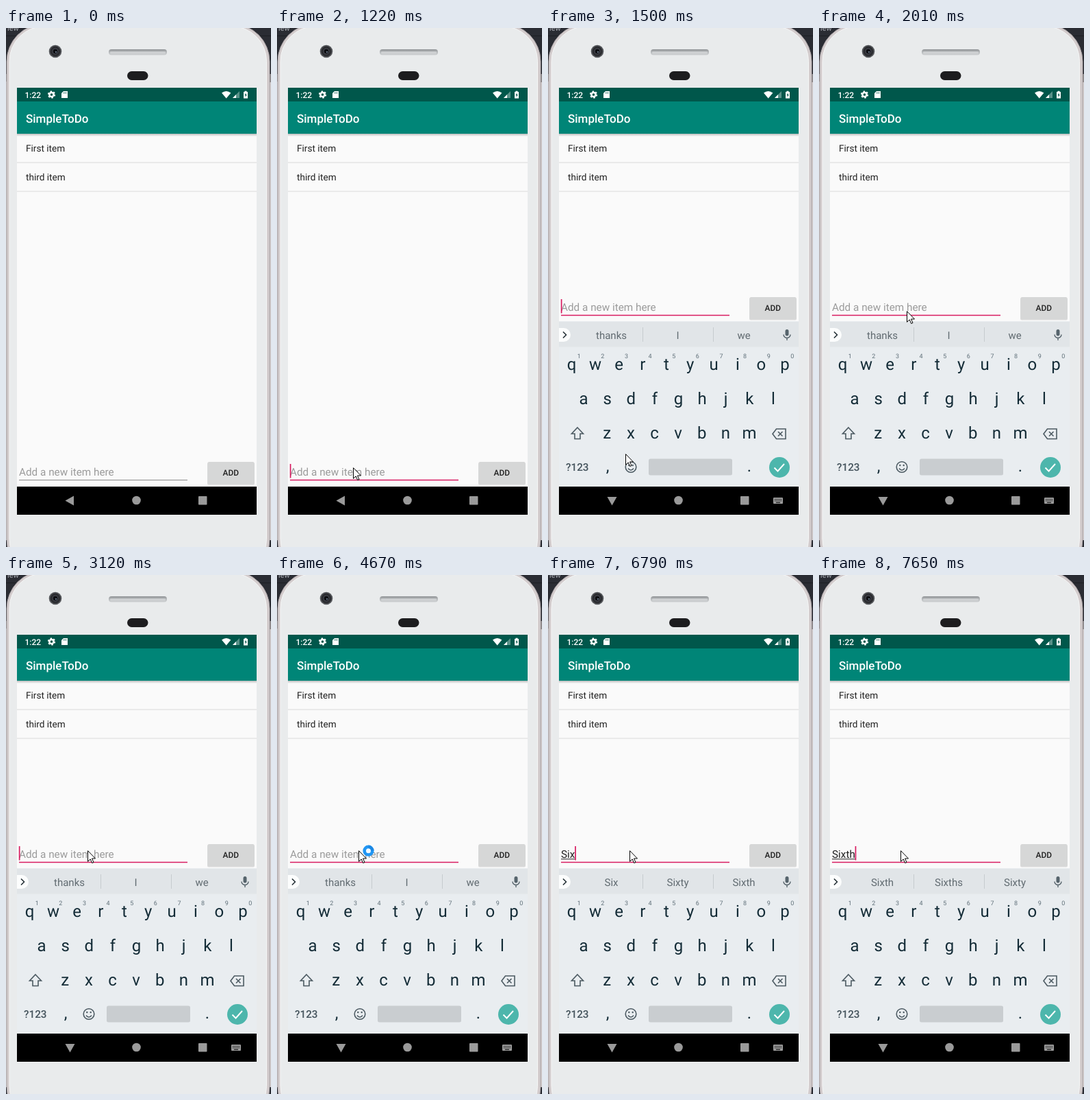
Recreate the animation shown at these times as an HTML page. Size 387 by 756 pixels, loop 8000 ms.

```html
<!DOCTYPE html>
<html lang="en">
<head>
<meta charset="utf-8">
<title>To-do list</title>
<style>
  html, body { margin: 0; width: 100%; height: 100%; overflow: hidden; background: #2a2c33; }
  svg { display: block; font-family: Roboto, sans-serif; text-rendering: geometricPrecision; }
  .mid { text-anchor: middle; }
  .key { font-size: 24px; fill: #142c37; }
  .num { font-size: 9px; fill: #607079; }
  .tip { font-size: 15px; fill: #616b71; }
  .field { font-size: 15.3px; }
  .item { font-size: 13.6px; fill: #212121; }
  .bold { font-weight: 500; }
  .icon { fill: none; stroke: #4c5a62; stroke-width: 1.6; }
</style>
</head>
<body>
<svg width="387" height="756" viewBox="0 0 387 756">
  <defs>
    <linearGradient id="fade" x2="0" y2="1">
      <stop stop-color="#000" stop-opacity=".25"/><stop offset="1" stop-color="#000" stop-opacity="0"/>
    </linearGradient>
    <linearGradient id="slot" x2="0" y2="1">
      <stop stop-color="#8f9295"/><stop offset=".5" stop-color="#b9bcbe"/><stop offset="1" stop-color="#cfd1d3"/>
    </linearGradient>
  </defs>

  <!-- Desktop and phone body -->
  <path d="M0 11.5H387" stroke="#1d1f24"/>
  <text x="-5" y="4" font-size="11" fill="#a9adb3">View</text>
  <path d="M272 0h9" stroke="#a9adb3"/>
  <path d="M0 68h3v688H0zM384 68h3v688h-3z" fill="#d2cccd"/>
  <path d="M0 67h2v11H0zM384 67h3v12h-3z" fill="#8b8688"/>
  <path d="M0 746h3v10H0zM384 746h3v10h-3z" fill="#2a2c33"/>
  <rect x="1" y="-6" width="384" height="806" rx="55" fill="#d3cccd" stroke="#a8a1a4"/>
  <rect x="5" y="-2.500" width="375.500" height="798" rx="51" fill="#e9ebec" stroke="#f6f6f6"/>
  <circle cx="72" cy="34" r="9.300" fill="#55575b"/>
  <circle cx="72" cy="34" r="7.500" fill="#2b2c30"/>
  <circle cx="72" cy="34" r="4" fill="#0c0d11" stroke="#4a4c55"/>
  <circle cx="73" cy="35" r="1.300" fill="#5b6877"/>
  <rect x="150" y="31" width="85" height="8.500" rx="4" fill="url(#slot)"/>
  <rect x="152" y="34.500" width="81" height="3" rx="1.500" fill="#d0d2d4"/>
  <rect x="177" y="63" width="30.500" height="13" rx="6.500" fill="#1d1d1f"/>

  <!-- Screen -->
  <rect x="16" y="87" width="350" height="622" fill="#fafafa"/>
  <rect x="16" y="154" width="350" height="4" fill="url(#fade)"/>
  <rect x="16" y="87" width="350" height="20" fill="#00574b"/>
  <rect x="16" y="107" width="350" height="47" fill="#008577"/>
  <g fill="#fff">
    <text class="bold" x="27.500" y="101.500" font-size="12">1:22</text>
    <circle cx="66.500" cy="97" r="3.100" fill="none" stroke="#fff" stroke-width="2.500"/>
    <circle cx="66.500" cy="97" r="4.700" fill="none" stroke="#fff" stroke-width="1.800" stroke-dasharray="2.460 2.460"/>
    <path d="M84 92h6v10h-9v-7z"/>
    <path d="M84.500 93.500v2M86.300 93.500v2M88.100 93.500v2" stroke="#00574b" stroke-width=".8"/>
    <path d="M315 94.500Q321.700 89.500 328.400 94.500L321.700 102.500z"/>
    <path d="M341 92v10h-10z" opacity=".35"/><path d="M336 97v5h-5z"/>
    <path d="M347 93h1.500v-1.200h3V93h1.500v9.500h-6z"/>
    <path d="M350.500 94.500l-2 3.500h1.200v2.800l2-3.700h-1.200z" fill="#00574b"/>
    <text class="bold" x="29" y="137.500" font-size="17">SimpleToDo</text>
  </g>
  <text class="item" x="29" y="180">First item</text>
  <text class="item" x="29" y="222">third item</text>
  <path d="M16 196H366M16 238H366" stroke="#dcdcdc" stroke-width="1.200"/>

  <!-- Entry row, placed for the open keyboard -->
  <g id="entry">
    <text class="field" id="typed" x="19" y="412"/>
    <rect id="mark" x="19" y="413.300" height="1" fill="#212121"/>
    <path id="line" d="M19 418.500H265"/>
    <rect id="caret" y="395" width="1.700" height="20.500" fill="#d81b60"/>
    <rect x="294" y="393" width="69" height="32.500" rx="2" fill="#000" opacity=".13"/>
    <rect x="294.500" y="392" width="68" height="32" rx="2" fill="#d6d7d7"/>
    <text class="mid bold" x="328.300" y="412" font-size="11.900" fill="#212121">ADD</text>
  </g>

  <rect id="board" x="16" y="427" width="350" height="241" fill="#e9edf0"/>
  <g id="keys">
    <rect x="16" y="428" width="350" height="36.500" fill="#e1e5e8"/>
    <path d="M138.500 436v21M241.500 436v21" stroke="#c6cccf"/>
    <path d="M16 437h7a10 10 0 0 1 0 20h-7z" fill="#fcfdfd"/>
    <path class="icon" d="M22 442.500l4.500 4.500-4.500 4.500" style="stroke:#263238"/>
    <rect x="346.500" y="439" width="5" height="9.500" rx="2.500" fill="#56646c"/>
    <path class="icon" d="M344 446.500a5 5 0 0 0 10 0M349 451.500v3.500" style="stroke-width:1.300"/>
    <path class="icon" d="M43 582l8.500 9H47v7.500h-8V591h-4.500z"/>
    <path class="icon" d="M333.500 584H347v14.500h-13.500L328 591.200zM336 588l6.500 6.500M342.500 588l-6.500 6.500"/>
    <text class="bold" x="26" y="645" font-size="15.300" fill="#44535c">?123</text>
    <circle class="icon" cx="121" cy="639.500" r="7.800"/>
    <path class="icon" d="M117 641.500q4 5 8 0"/>
    <circle cx="118.300" cy="637" r="1.200" fill="#4c5a62"/><circle cx="123.700" cy="637" r="1.200" fill="#4c5a62"/>
    <rect x="147" y="627.500" width="122" height="24" rx="2.500" fill="#c9cdd0"/>
    <circle cx="338" cy="640" r="15" fill="#4db6ac"/>
    <path d="M330.500 640.500l5 5 9.500-10.500" fill="none" stroke="#fff" stroke-width="1.900"/>
  </g>

  <!-- Navigation bar -->
  <rect x="16" y="668" width="350" height="41" fill="#000"/>
  <g fill="#9a9a9a">
    <path id="back" d="M86.500 688.500l12.500-7v14z"/>
    <circle cx="190.500" cy="688" r="6.300"/>
    <rect x="281" y="682" width="12.500" height="12.500" rx=".8"/>
    <g id="switch">
      <rect x="329" y="684" width="14" height="9" rx="1"/>
      <path d="M331 686.500h10M331 688.700h10" stroke="#000" stroke-dasharray="1.200 1"/>
      <path d="M333 691.200h6" stroke="#000"/>
    </g>
  </g>

  <g id="pointer">
    <path d="M.5 .7V16.300L4.200 12.900 6.700 18.500 9 17.500 6.500 12H11.500z" fill="#fff" stroke="#000"/>
    <g id="busy">
      <circle cx="14.500" cy=".7" r="5.800" fill="#f4fafe" stroke="#2196f3" stroke-width="4.600"/>
      <path d="M14.500 -5.100a5.800 5.800 0 0 1 5.800 5.800" fill="none" stroke="#1479d6" stroke-width="4.600" opacity=".5"/>
    </g>
  </g>
</svg>
<script>
const LOOP = 8000;
const $ = id => document.getElementById(id);
const show = (id, on) => $(id).setAttribute('display', on ? 'inline' : 'none');

function label(cls, x, y, text = '') {
  const node = document.createElementNS('http://www.w3.org/2000/svg', 'text');
  node.setAttribute('class', 'mid ' + cls);
  node.setAttribute('x', x);
  node.setAttribute('y', y);
  node.textContent = text;
  return $('keys').appendChild(node);
}

const STEP = 34.62;
[['qwertyuiop', 34.5, 498], ['asdfghjkl', 52, 548], ['zxcvbnm', 86.3, 598]].forEach(([row, x, y]) =>
  [...row].forEach((c, i) => label('key', x + i * STEP, y, c)));
[...'1234567890'].forEach((c, i) => label('num', 45.2 + i * STEP, 481, c));
label('key', 87, 646, ',');
label('key', 294, 646, '.');
const tips = [92.5, 189.5, 286].map(x => label('tip', x, 452.5));

// Each list holds [start time, value]; a value stays until the next one.
const typing = [[0, ''], [5370, 'S'], [6790, 'Six'], [7500, 'Sixt'], [7650, 'Sixth']];
const suggestions = [[0, 'thanks I we'], [5520, 'S So Sorry'], [6790, 'Six Sixty Sixth'],
  [7500, 'Sixt Sixth Sixty'], [7650, 'Sixth Sixths Sixty']];
const pointer = [[0, null], [680, [59, 649]], [830, [111, 640]], [1350, [113, 620]], [1620, [124, 564]],
  [1770, [144, 500]], [1890, [140, 445]], [2010, [128, 412]], [2130, [119, 401]]];
const caretFlips = [1220, 1620, 2130, 2570, 3120, 3530, 3990, 4540, 5090, 5920, 6350, 7350, 7500];
const busyFlips = [4110, 4390, 4670, 4970, 5240, 6050, 7190, 7500];

const at = (list, t) => list.filter(([start]) => start <= t).pop()[1];
const flipped = (times, t) => times.filter(s => s <= t).length % 2 === 1;

function draw(t) {
  const open = t >= 1350, focus = t >= 1080;
  const text = at(typing, t), pos = at(pointer, t);

  $('entry').setAttribute('transform', `translate(0 ${open ? 0 : 240})`);
  $('typed').textContent = text || 'Add a new item here';
  $('typed').setAttribute('fill', text ? '#212121' : '#9b9b9b');
  const width = text ? $('typed').getComputedTextLength() : 0;
  $('mark').setAttribute('width', width);
  $('caret').setAttribute('x', 18.8 + width);
  show('caret', flipped(caretFlips, t));
  $('line').setAttribute('stroke', focus ? '#d81b60' : '#8a8a8a');
  $('line').setAttribute('stroke-width', focus ? 1.7 : 1);

  show('board', open);
  show('keys', t >= 1500);
  show('switch', open);
  $('back').setAttribute('transform', open ? 'rotate(-90 93.500 688.500)' : '');
  at(suggestions, t).split(' ').forEach((word, i) => tips[i].textContent = word);

  show('pointer', pos);
  if (pos) $('pointer').setAttribute('transform', `translate(${pos})`);
  show('busy', flipped(busyFlips, t));
}

const began = performance.now();
function frame() {
  draw((performance.now() - began) % LOOP);
  requestAnimationFrame(frame);
}
frame();
</script>
</body>
</html>
```
